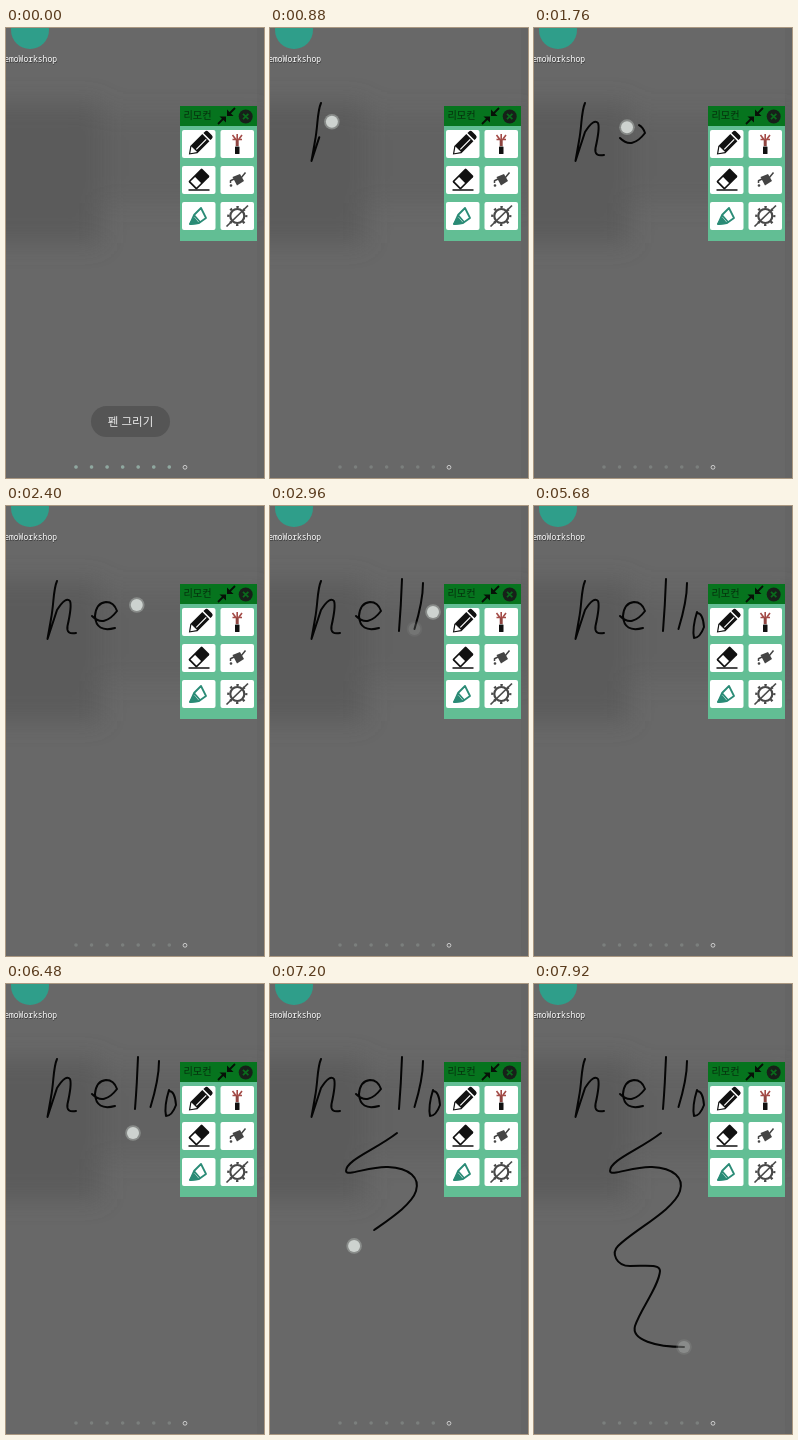
An HTML page that plays this animation: 258x450 px, repeating every 8 s.

```html
<!DOCTYPE html>
<html lang="ko">
<head>
<meta charset="utf-8">
<title>Pen drawing</title>
<style>
html, body { margin: 0; width: 100%; height: 100%; overflow: hidden; background: #686868; }
svg { display: block; width: 100%; height: 100%; }
text { font-family: "Noto Sans CJK KR", "Noto Sans CJK", "Noto Sans", sans-serif; }
.label { font: 8px "Noto Sans Mono", monospace; text-anchor: end; fill: #fff; }
.shade { fill: #3a3a3a; }
#ink { fill: none; stroke: #050505; stroke-width: 2; stroke-linecap: round; stroke-linejoin: round; }
</style>
</head>
<body>
<svg viewBox="0 0 258 450" preserveAspectRatio="none">
  <defs>
    <filter id="soft" x="-50%" y="-50%" width="200%" height="200%"><feGaussianBlur stdDeviation="12"/></filter>
    <g id="finger">
      <circle r="7.8" fill="#969997" opacity=".75"/>
      <circle r="6" fill="#cdd2cf"/>
    </g>
    <rect id="key" width="33.5" height="28" rx="2" fill="#fff"/>
  </defs>

  <rect width="258" height="450" fill="#686868"/>
  <g filter="url(#soft)" fill="#575757">
    <rect x="-30" y="75" width="125" height="140" opacity=".75"/>
    <rect x="85" y="85" width="180" height="90" opacity=".4"/>
  </g>
  <rect x="251" width="7" height="450" fill="#606060" opacity=".4"/>

  <circle cx="24" cy="2" r="19" fill="#2f9e8a"/>
  <text class="label shade" x="51.5" y="35">DemoWorkshop</text>
  <text class="label" x="51" y="34.400">DemoWorkshop</text>

  <!-- page dots -->
  <path d="M70 439H164" stroke="#7b7f7d" stroke-width="3.600" stroke-linecap="round" stroke-dasharray="0 15.550"/>
  <circle cx="179" cy="439.300" r="1.900" fill="none" stroke="#d4d4d4" stroke-width=".9"/>

  <g id="toast">
    <path d="M70 439H164" stroke="#8fa8a0" stroke-width="3.600" stroke-linecap="round" stroke-dasharray="0 15.550"/>
    <rect x="85" y="378" width="79" height="31" rx="15.500" fill="#555"/>
    <text x="124.500" y="398" font-size="11.500" text-anchor="middle" fill="#ececec">펜 그리기</text>
  </g>

  <g id="ink">
    <path data-from="480" data-to="1040" d="M51 75C47 84 48 98 45 113L41.500 133L51 104Q60 90 64 95Q66 100 61.500 120Q60 129 70 127"/>
    <path data-from="1440" data-to="2000" d="M86 110Q98 122 111 105Q108 96 100 96Q90 97 89 110Q90 127 109 122"/>
    <path data-from="2320" data-to="2480" d="M132 73Q131 100 129 125"/>
    <path data-from="2640" data-to="2760" d="M153 77Q153 95 144.500 123"/>
    <path data-from="2960" data-to="3360" d="M163 106Q158 122 160 132Q166 132 170 121Q169 107 163 107"/>
    <path data-from="6480" data-to="7760" d="M127 149C105 166 76 176 76 187C76 193 100 182 118 183C140 184 150 194 146 207C140 226 100 246 84 262C77 269 82 282 96 282C114 282 126 280 126 287C125 302 106 326 101 342C97 356 122 363 150 363"/>
  </g>

  <g id="panel">
    <rect x="174" y="78" width="77" height="135" fill="#62be94"/>
    <rect x="174" y="78" width="77" height="20" fill="#06741e"/>
    <text x="177.500" y="91" font-size="10.200" font-weight="300" fill="#06300d">리모컨</text>
    <path d="M229 80L223 86M212 96L218 90" stroke="#071107" stroke-width="1.800"/>
    <path d="M221 81.500V88H227.500ZM220 94.500V88.500H213.500Z" fill="#071107"/>
    <circle cx="239.700" cy="88.500" r="7" fill="#172019"/>
    <path d="M237 85.800l5.400 5.400m0-5.400l-5.400 5.400" stroke="#0a6a1c" stroke-width="1.800"/>
    <g id="keys"></g>

    <!-- pencil -->
    <g transform="translate(193.500 116) rotate(-45)" fill="#111">
      <path d="M-15 0L-8-5H9V5H-8Z"/>
      <path d="M10.500-5h2q2.500 0 2.500 2.500v5q0 2.500-2.500 2.500h-2z"/>
      <path d="M-12 0L-8-2.800V2.800ZM-6 1.500H8" fill="#fff" stroke="#fff" stroke-width="1.200"/>
    </g>
    <!-- laser pointer -->
    <rect x="229" y="118.500" width="4.500" height="7.500" rx=".6" fill="#111"/>
    <path d="M229.700 111h3v7h-3z" fill="#8e4440"/>
    <path d="M231.200 111v-5M229.500 111l-3-4M233 111l3-4M226.500 111.500h9.500" stroke="#a44c48" stroke-width="1.600"/>
    <!-- eraser -->
    <g transform="translate(193 151) rotate(-45)">
      <rect x="-9.500" y="-5.800" width="19" height="11.600" rx="1.200" fill="#111"/>
      <rect x="-7.800" y="-4.200" width="6.500" height="8.400" fill="#fff"/>
    </g>
    <path d="M182.500 162h21" stroke="#111" stroke-width="1.500"/>
    <!-- bucket -->
    <g fill="#444" stroke="#444" stroke-width="1.500">
      <path stroke="none" d="M226.500 149l7.500-3 4 7-7 4.500z"/>
      <path d="M235 150l4.500-5.500M228 151l-4 2M224.500 153v2"/>
      <circle cx="225" cy="157.500" r=".6"/>
    </g>
    <!-- marker -->
    <g fill="none" stroke="#2a8b76" stroke-width="1.800" stroke-linejoin="round">
      <path d="M184 196L188 187L195 180L200 190L193 195ZM188 187L194 194"/>
      <path d="M184 196L188 190L192 195Z" fill="#2a8b76"/>
    </g>
    <!-- gear -->
    <g fill="none" stroke="#484848" stroke-width="2.200">
      <circle cx="231.300" cy="188" r="9" stroke-dasharray="2.400 4.669" stroke-dashoffset="1.200"/>
      <circle cx="231.300" cy="188" r="7"/>
      <path d="M220.500 198.500L242 177.500" stroke-width="1.700"/>
    </g>
  </g>

  <g id="touches"></g>
</svg>
<script>
const LOOP = 8000, STEP = 80;
const LAG = 80;    // ink trails the finger
const FADE = 240;  // finger mark after lifting
const $ = id => document.getElementById(id);
const clamp = v => Math.max(0, Math.min(1, v));

function add(parent, href) {
  const el = document.createElementNS('http://www.w3.org/2000/svg', 'use');
  el.setAttribute('href', href);
  return $(parent).appendChild(el);
}

const strokes = [...$('ink').children].map(path => ({
  path,
  from: +path.dataset.from,
  to: +path.dataset.to,
  size: path.getTotalLength(),
  touch: add('touches', '#finger')
}));

for (let i = 0; i < 6; i++)
  add('keys', '#key').setAttribute('transform', `translate(${176 + i % 2 * 38.5} ${102 + (i >> 1) * 36})`);

function draw({ path, from, to, size, touch }, t) {
  const done = time => clamp((time - from) / (to - from));
  const ink = done(t - LAG);
  path.style.visibility = ink > 0 ? 'visible' : 'hidden';
  path.style.strokeDasharray = `${ink * size} ${size + 9}`;

  const { x, y } = path.getPointAtLength(done(t) * size);
  touch.setAttribute('transform', `translate(${x} ${y})`);
  touch.style.opacity = t < from ? 0 : clamp(1 - (t - to) / FADE);
}

const begin = performance.now();
function frame() {
  const t = Math.floor((performance.now() - begin) % LOOP / STEP) * STEP;
  $('toast').style.opacity = clamp(1 - t / 320);
  strokes.forEach(s => draw(s, t));
  requestAnimationFrame(frame);
}
frame();
</script>
</body>
</html>
```
